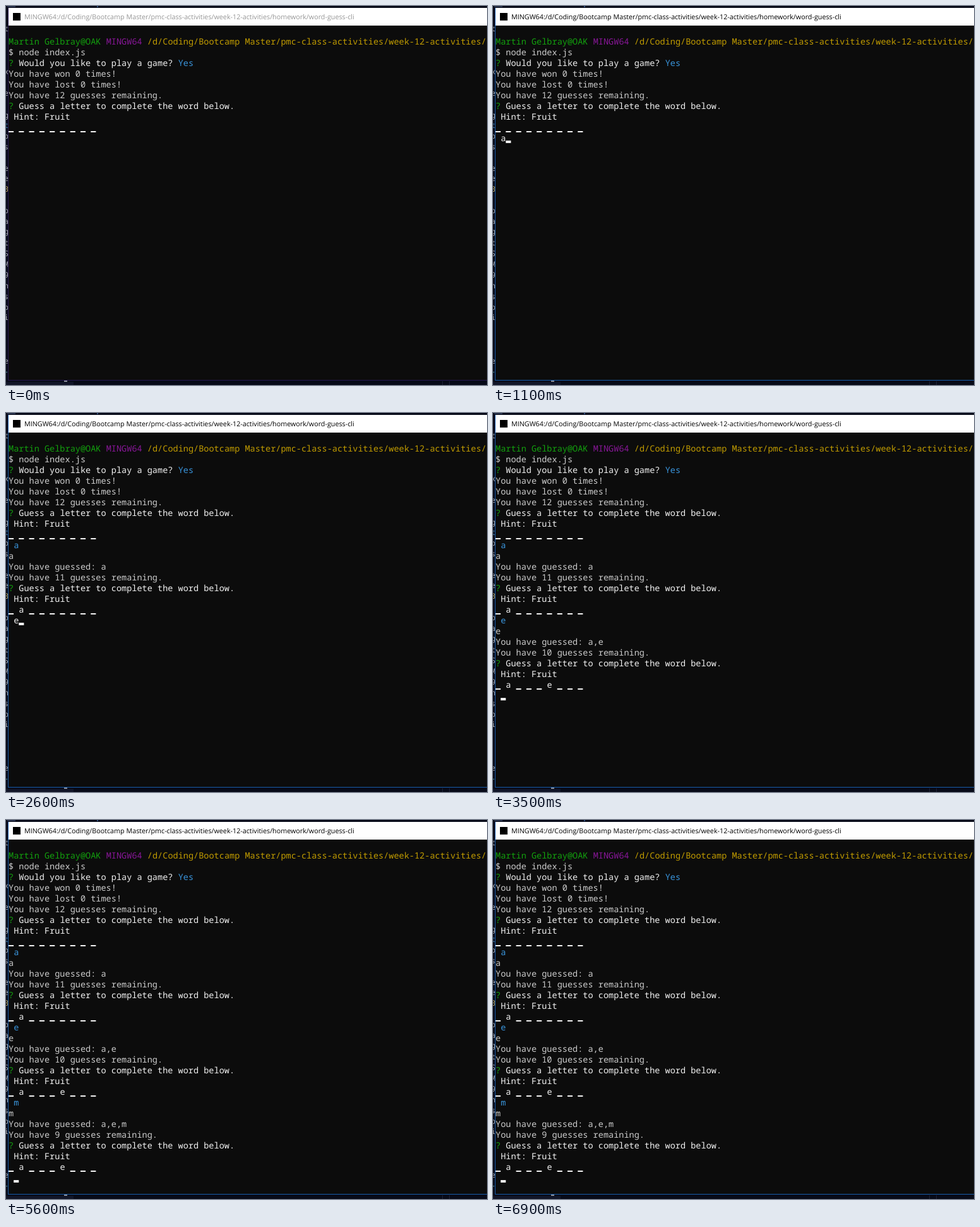
Recreate the animation shown at these times as an HTML page with a canvas. Size 762 by 600 pixels, loop 7100 ms.

```html
<!DOCTYPE html>
<html lang="en">
<head>
<meta charset="utf-8">
<title>Word guess in a terminal</title>
<style>
  html, body { margin: 0; width: 100%; height: 100%; overflow: hidden; background: #0c0c0c; }
  canvas { display: block; width: 762px; height: 600px; }
</style>
</head>
<body>
<canvas id="stage" width="762" height="600"></canvas>
<script>
const ctx = document.getElementById('stage').getContext('2d');
const LOOP = 7100;
const CELL = 8.142, ROW = 17.02, LEFT = 4, BASE = 60.7;
const MONO = '13.57px "Noto Sans Mono", monospace';
const GREEN = '#13a10e', PURPLE = '#881798', GOLD = '#c19c00';
const BLUE = '#3a96dd', GREY = '#cccccc', WHITE = '#f2f2f2';
const PATH = '/d/Coding/Bootcamp Master/pmc-class-activities/week-12-activities/homework/word-guess-cli';

// Each guess: letter, time typed, time submitted, word shown afterwards.
const guesses = [
  { letter: 'a', typed: 1100, sent: 1300, word: '_ a _ _ _ _ _ _ _' },
  { letter: 'e', typed: 2600, sent: 2900, word: '_ a _ _ _ e _ _ _' },
  { letter: 'm', typed: 5300, sent: 5500, word: '_ a _ _ _ e _ _ _' }
];
const cursorOn = [[1100, 1950], [2400, 3000], [3300, 4100], [4600, 5100], [5300, 6300], [6700, LOOP]];

// Slivers of the window behind: [character, centre y, colour]
const slivers = [
  ['t', 36], ['x', 104], ['e', 138], ['g', 173], ['t', 189, '#3f7fae'], ['o', 206], ['s', 223],
  ['e', 257], ['e', 273], ['B', 290, '#b9a35a'], ['o', 324], ['a', 341], ['g', 357], ['t', 375],
  ['S', 392], ['M', 409], ['9', 426], ['n', 443], ['s', 460], ['o', 477], ['i', 493],
  ['e', 562], ['-', 579, '#4f9aa0']
];

function rect(x, y, w, h, color) {
  ctx.fillStyle = color;
  ctx.fillRect(x, y, w, h);
}

function text(str, x, y, color) {
  ctx.fillStyle = color;
  ctx.fillText(str, x, y);
}

const mix = (a, b, k) => 'rgb(' + a.map((v, i) => Math.round(v + (b[i] - v) * k)) + ')';

function put(row, col, str, color) {
  text(str, LEFT + col * CELL, BASE + row * ROW, color);
}

function putWord(row, word) {
  [...word].forEach((ch, col) => {
    if (ch === '_') rect(LEFT + col * CELL, Math.round(BASE + row * ROW) + 1, CELL, 2, WHITE);
    else if (ch !== ' ') put(row, col, ch, WHITE);
  });
}

function putRound(row, left, word) {
  put(row, 0, `You have ${left} guesses remaining.`, GREY);
  put(row + 1, 0, '?', GREEN);
  put(row + 1, 2, 'Guess a letter to complete the word below.', WHITE);
  put(row + 2, 1, 'Hint: Fruit', WHITE);
  putWord(row + 3, word);
}

function drawBehind() {
  rect(0, 0, 762, 600, '#070a18');
  rect(0, 595, 107, 5, '#111528');
  rect(92, 593, 5, 2, '#8b8f9a');
  rect(691, 594, 1, 6, '#1d2136');
  rect(702, 594, 1, 6, '#1d2136');
  rect(144, 0, 2, 2, '#2c4a7a');
  rect(2, 0, 13, 2, '#26304a');
  ctx.save();
  ctx.beginPath();
  ctx.rect(0, 31, 3, 562);
  ctx.clip();
  ctx.font = '12px "Noto Sans Mono", monospace';
  ctx.textAlign = 'right';
  for (const [ch, y, color = '#a4a7ad'] of slivers) text(ch, 4, y + 4, color);
  ctx.restore();
}

function drawFrame(focus) {
  const edge = mix([38, 25, 82], [24, 92, 170], focus);
  rect(3, 3, 759, 590, edge);
  rect(4, 31, 758, 561, '#0c0c0c');
  rect(4, 3, 758, 28, '#ffffff');
  rect(11, 11, 12, 12, '#000000');
  ctx.font = '10.75px "Open Sans", sans-serif';
  text('MINGW64:' + PATH, 29, 21, mix([150, 150, 150], [0, 0, 0], focus));
}

function drawConsole(t) {
  ctx.font = MONO;
  put(0, 0, 'Martin Gelbray@OAK', GREEN);
  put(0, 19, 'MINGW64', PURPLE);
  put(0, 27, PATH, GOLD);
  put(1, 0, '$ node index.js', GREY);
  put(2, 0, '?', GREEN);
  put(2, 2, 'Would you like to play a game?', WHITE);
  put(2, 33, 'Yes', BLUE);
  put(3, 0, 'You have won 0 times!', GREY);
  put(4, 0, 'You have lost 0 times!', GREY);
  putRound(5, 12, '_ _ _ _ _ _ _ _ _');

  let row = 9, col = 1;
  const used = [];
  guesses.forEach((g, i) => {
    if (t >= g.sent) {
      used.push(g.letter);
      put(row, 1, g.letter, BLUE);
      put(row + 1, 0, g.letter, GREY);
      put(row + 2, 0, 'You have guessed: ' + used, GREY);
      putRound(row + 3, 11 - i, g.word);
      row += 7;
    } else if (t >= g.typed) {
      put(row, 1, g.letter, WHITE);
      col = 2;
    }
  });
  if (cursorOn.some(([from, to]) => t >= from && t < to)) {
    rect(LEFT + col * CELL, Math.round(BASE + row * ROW) - 1, CELL, 4, WHITE);
  }
}

function draw(now) {
  const t = Math.floor((now % LOOP) / 100) * 100;
  const focus = Math.min(1, t / 200);
  drawBehind();
  drawFrame(focus);
  drawConsole(t);
  requestAnimationFrame(draw);
}

ctx.textRendering = 'geometricPrecision';
requestAnimationFrame(draw);
</script>
</body>
</html>
```
